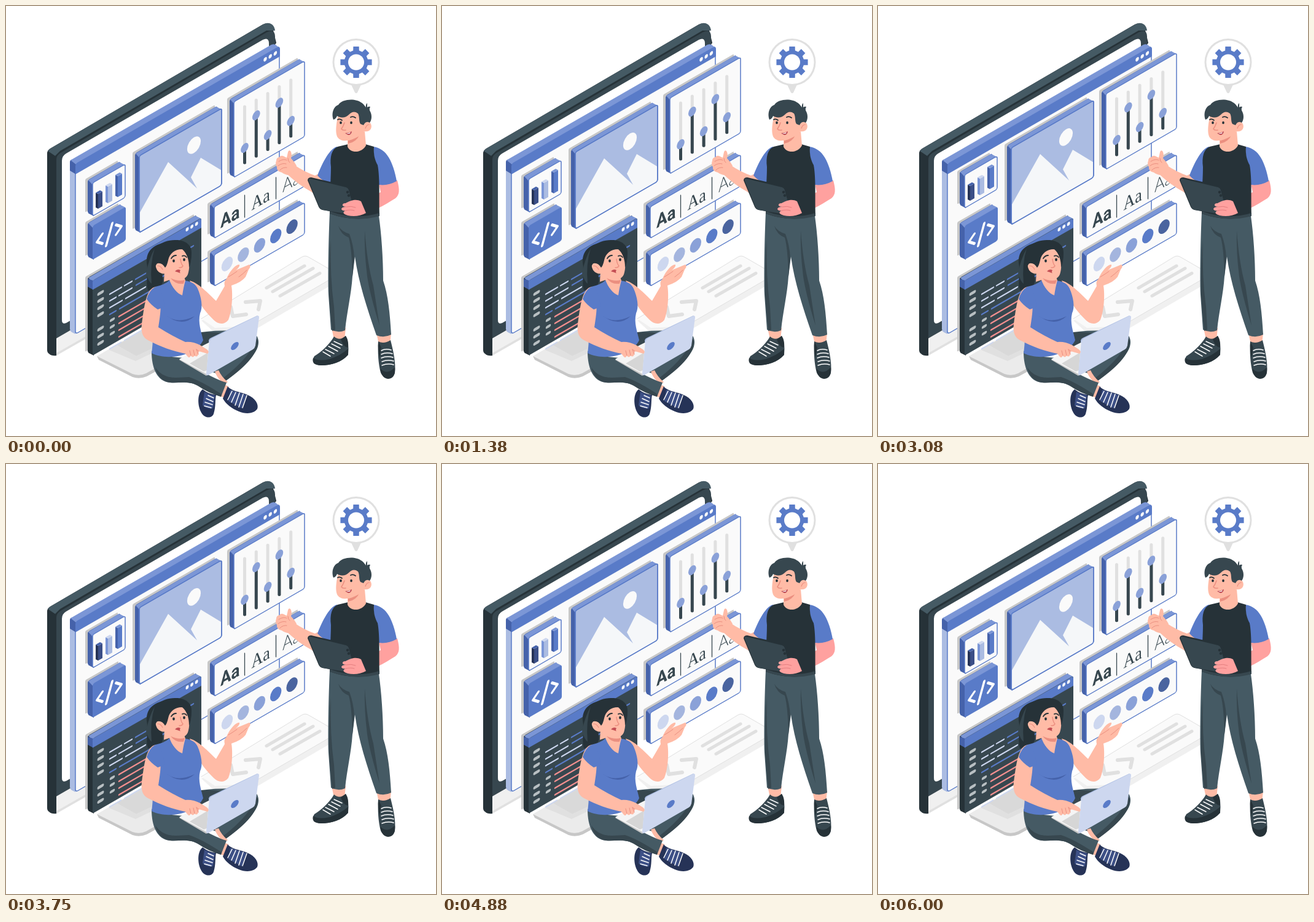
Animation of 700 by 700 pixels, one loop 6040 ms. Source, as an HTML page with a canvas:

```html
<!DOCTYPE html>
<html lang="en">
<head>
<meta charset="utf-8">
<title>Interface design</title>
<style>
html, body { margin: 0; width: 100%; height: 100%; overflow: hidden; background: #fff; }
canvas { display: block; width: 700px; height: 700px; }
</style>
</head>
<body>
<canvas id="stage"></canvas>
<script>
const LOOP = 6040, LIFT = 13.3, SLOPE = 0.577, COS = 0.866;
const BLUE = '#597bc8', DEEP = '#4562aa', LIGHT = '#7b96d6', PALE = '#abbce2', MIST = '#cdd7ef';
const INK = '#263238', SLATE = '#37474f', STEEL = '#455a64', SHEET = '#fafafa', GREY = '#e0e0e0', SHADE = '#c7c7c7';
const SKIN = '#ffbba6', PINK = '#ffa19f', BLUSH = '#eb8f80', NAVY = '#263357';

const canvas = document.getElementById('stage');
const ctx = canvas.getContext('2d');
const dpr = window.devicePixelRatio || 1;
canvas.width = canvas.height = 700 * dpr;

function fill(color, d) {
  ctx.fillStyle = color;
  ctx.fill(new Path2D(d));
}

function line(color, width, d) {
  ctx.strokeStyle = color;
  ctx.lineWidth = width;
  ctx.lineCap = ctx.lineJoin = 'round';
  ctx.stroke(new Path2D(d));
}

function oval(color, x, y, rx, ry, turn = 0) {
  ctx.fillStyle = color;
  ctx.beginPath();
  ctx.ellipse(x, y, rx, ry, turn, 0, Math.PI * 2);
  ctx.fill();
}

// Draws in the plane of the upright screen, with its origin at x, y.
function iso(x, y, draw) {
  ctx.save();
  ctx.transform(1, -SLOPE, 0, 1, x, y);
  draw();
  ctx.restore();
}

const disc = (color, x, y, r) => iso(x, y, () => oval(color, 0, 0, r * COS, r));

function sheet(color, x, y, w, h, r = 3, edge) {
  iso(x, y, () => {
    ctx.beginPath();
    ctx.roundRect(0, 0, w, h, r);
    ctx.fillStyle = color;
    ctx.fill();
    if (edge) {
      ctx.strokeStyle = edge;
      ctx.lineWidth = 1.5;
      ctx.stroke();
    }
  });
}

function block(x, y, w, h, face, depth, { top = LIGHT, side = DEEP, edge } = {}) {
  const dy = depth * SLOPE, rise = w * SLOPE;
  sheet(side, x - depth, y - dy, w, h);
  fill(side, `M${x - depth},${y - dy + 2}L${x + 2},${y}V${y + h}L${x - depth + 1},${y + h - dy}Z`);
  fill(top, `M${x - depth + 1},${y - dy}L${x - depth + w - 2},${y - dy - rise + 1}L${x + w - 1},${y - rise + 1}V${y - rise + 4}L${x},${y + 3}Z`);
  sheet(face, x, y, w, h, 3, edge);
}

function panel(x, y, w, h, face, depth = 7, opt = { edge: BLUE }) {
  sheet(SHADE, x - depth - 4, y - depth * SLOPE - 1.5, w, h, 2);
  block(x, y, w, h, face, depth, opt);
}

function monitor() {
  fill('#ebebeb', 'M148,570L235,519L262,582L228,602Q218,607 207,603L152,575Z');
  fill(SHADE, 'M148,570L206,599Q217,603 228,598L262,579V585L229,603Q217,608 206,604L151,576Z');
  fill('#d9d9d9', 'M180,552L232,523L242,556L212,570Z');
  fill(GREY, 'M180,552L212,570L242,556V563L211,578L168,560Z');
  fill(INK, 'M67,240Q67,235 72,232L418,30Q426,26 433,31L440,60L82,569Q74,570 70,566Q67,564 67,560Z');
  fill(STEEL, 'M68,236Q70,233 74,231L417,31Q426,25 433,30Q437,33 438,40L424,40L88,236L80,244Z');
  fill(SLATE, 'M82,250Q82,243 89,239L424,43Q438,36 438,50V335L82,541Z');
  fill('#f0f0f0', 'M82,541L300,415V443L82,569Z');
  fill(GREY, 'M82,565L140,532V536L82,569Z');
  fill('#fff', 'M91,252Q91,244 98,240L418,55Q428,50 428,61V324L98,516Q91,519 91,511Z');
}

function browser() {
  fill(PALE, 'M104,266L113,271V534L107,531Q104,529 104,526Z');
  sheet(SHEET, 113, 257, 332, 277, 4, BLUE);
  fill(DEEP, 'M104,254Q104,251 107,250L114,256V274L104,268Z');
  fill(LIGHT, 'M105,251L432,63Q437,61 440,64L445,68L114,258Z');
  fill(BLUE, 'M113,260Q113,257 116,255L440,68Q446,65 446,71V82L113,274Z');
  for (let i = 0; i < 3; i++) disc(SHEET, 422 + 8.2 * i, 86.7 - 4.8 * i, 3.2);
}

function codeIcon() {
  panel(141, 358, 54, 55, BLUE, 8, {});
  iso(168, 371.5, () => line('#fff', 4, 'M-11,-7L-20,1L-11,9M5,-15L-5,16M11,-9L20,-1L11,7'));
}

function codePanel() {
  panel(141, 447, 177, 122, SLATE, 8, { side: INK });
  fill(DEEP, 'M133,444L142,447V462L133,457Z');
  fill(BLUE, 'M141,449Q141,447 143,446L315,347Q318,345 318,349V361L141,462Z');
  for (let i = 0; i < 3; i++) disc(SHEET, 295 + 7.6 * i, 363.5 - 4.4 * i, 2.9);
  iso(154, 467, () => {
    [0, 11.6, 23.2, 34.8, 58, 69.6, 81.2].forEach(y => line('#b8bfc2', 5, `M-3,${y}H3`));
  });
  iso(169, 469, () => {
    line(MIST, 2.4, 'M0,0H19M24,0H36M0,11H10M15,11H36M0,22H20M26,22H58');
    line(BLUE, 2.4, 'M42,0H60M43,10H70M64,21H90M0,33H10M16,33H68');
    line('#b8bfc2', 4.5, 'M2,44H6M2,55H6M2,66H6');
    line('#f28f8f', 2.6, 'M15,45H62M15,56H58M15,67H56M15,78H56');
    line(MIST, 2.4, 'M0,89H18M24,89H58');
    line(BLUE, 2.4, 'M120,0H136M78,0H112');
  });
}

function bars(x, y, h, face, side, top) {
  fill(side, `M${x},${y - h}L${x + 4},${y - h + 2}V${y}L${x},${y - 2}Z`);
  fill(face, `M${x + 4},${y - h + 2}L${x + 11},${y - h - 2}V${y - 4}L${x + 4},${y}Z`);
  fill(top, `M${x},${y - h}L${x + 7},${y - h - 4}L${x + 11},${y - h - 2}L${x + 4},${y - h + 2}Z`);
}

function chartPanel() {
  panel(141, 288, 53, 54, SHEET, 8);
  bars(146, 330, 26, '#3b4f87', NAVY, DEEP);
  bars(162, 321, 29, PALE, LIGHT, MIST);
  bars(178, 311, 36, BLUE, DEEP, LIGHT);
}

function picturePanel() {
  panel(217, 244, 134, 125, PALE);
  fill('#f5f7f9', 'M218,336L264,254L311,297L301,279L317,247L350,267V288Q350,291 347,293L220,366Q218,367 218,364Z');
  disc(SHEET, 306, 226.5, 12.8);
  sheet('transparent', 217, 244, 134, 125, 3, BLUE);
}

function sliderPanel() {
  panel(371, 156, 115, 123, SHEET);
  [231, 178, 210, 157.5, 187].forEach((knob, i) => {
    const x = 388.5 + i * 18.8, top = 164 - i * 10.8, end = top + 91;
    line(GREY, 5, `M${x},${top}V${end}`);
    line(SLATE, 5, `M${x},${knob}V${end}`);
    disc('#8aa1d8', x, knob, 7.3);
  });
}

function typePanel() {
  panel(339, 327, 147, 51, SHEET);
  const fonts = ['bold 30px Roboto, sans-serif', '30px "Liberation Serif", serif', '300 29px Lato, sans-serif'];
  fonts.forEach((font, i) => {
    iso(349 + 50.5 * i, 362 - 29.1 * i, () => {
      ctx.scale(COS, 1);
      ctx.font = font;
      ctx.fillStyle = SLATE;
      ctx.fillText('Aa', 0, 0);
    });
  });
  line(SLATE, 1.3, 'M388.5,308V344M439.5,279V314');
}

function colorPanel() {
  panel(339, 405, 147, 51, SHEET);
  [MIST, '#a4b5de', '#8aa1d8', BLUE, '#4a649f'].forEach((color, i) => disc(color, 360 + 26.4 * i, 420 - 15.2 * i, 10.6));
}

function keyboard() {
  fill('#f0f0f0', 'M318,512L525,430V457L410,524L340,532Z');
  fill(SHEET, 'M318,509L481,409Q487,405 493,409L526,428V446L397,521L340,524Z');
  line(GREY, 1, 'M318,509L481,409Q487,405 493,409L526,428M526,446L397,521');
  line(GREY, 5, 'M424,459L486,423M434,465L500,427M446,472L511,435');
  line(GREY, 6, 'M390,482L414,480L411,494M366,490L369,505L391,502');
}

function bubble() {
  fill(GREY, 'M561,126H579L572,141Q570,143 568,141Z');
  oval(GREY, 570, 91.5, 38.5, 38.5);
  oval('#fff', 570, 91.5, 35.5, 35.5);
  ctx.beginPath();
  for (let i = 0; i < 8; i++) {
    [[-0.25, 19.5], [-0.18, 26], [0.18, 26], [0.25, 19.5]].forEach(([turn, r]) => {
      const a = i * Math.PI / 4 + turn;
      ctx.lineTo(570 + r * Math.cos(a), 91.5 + r * Math.sin(a));
    });
  }
  ctx.closePath();
  ctx.fillStyle = BLUE;
  ctx.fill();
  oval('#fff', 570, 91.5, 13, 13);
}

function manLegs() {
  fill(SKIN, 'M530,524H553L551,544L534,543ZM603,532H627L625,551H607Z');
  fill(SLATE, 'M534,538Q543,546 553,537Q559,548 557,567C548,579 530,585 513,585C499,584 498,576 502,570C512,564 526,552 534,538Z');
  fill(INK, 'M500,573Q508,579 526,575Q545,569 557,558V568C546,580 530,585 513,585C501,585 498,580 500,573ZM545,543L553,537Q558,544 557,556Q550,556 545,543Z');
  line('#fff', 1.5, 'M534,546L547,552M530,550L544,557M525,554L540,562M520,559L534,566M516,563L528,570');
  fill(SLATE, 'M606,546Q615,551 626,544C630,560 635,580 633,597C630,608 615,608 610,597C606,582 605,564 606,546Z');
  fill(INK, 'M609,590Q621,602 633,588Q635,606 622,607Q611,606 609,590ZM606,546L611,556L608,572Q605,560 606,546Z');
  line('#fff', 1.5, 'M611,561Q618,557 627,560M611,567Q619,563 629,566M611,573Q620,569 630,572M612,579Q621,575 631,578M612,585Q622,581 631,584');
  fill(STEEL, 'M527,336C525,380 524,440 525,470L529,527Q541,533 552,528C555,498 562,470 564,440L568,408C574,450 587,490 603,536Q615,541 627,535C625,500 622,470 614,447C614,410 611,370 607,342Z');
  fill(SLATE, 'M541,358Q546,367 559,371Q566,390 567,410L564,440Q563,395 558,377Q545,372 541,358ZM529,380Q527,440 534,490L536,527L531,529L526,475Q525,420 529,380ZM584,366Q588,420 598,455L608,520Q592,468 588,440Q583,400 584,366Z');
}

function manTop() {
  fill(SKIN, 'M468,258Q486,270 503,276L511,272L528,288L516,306Q507,310 498,303Q476,291 458,274Z');
  fill(BLUE, 'M539,229C528,231 515,254 507,276Q516,286 529,289L535,260Z');
  fill(PINK, 'M607,290L637,284C641,299 641,307 634,313C615,325 598,334 584,338L574,322L610,303Z');
  fill(BLUE, 'M598,229C620,232 630,254 636,285Q622,293 607,291L600,255Z');
  fill(INK, 'M540,229L557,225H585L599,229C598,243 601,252 605,259C609,280 607,315 608,341Q568,353 527,338C526,315 529,285 529,262C527,246 530,233 540,229Z');
  fill(SLATE, 'M527,334Q568,349 608,337V342Q568,353 527,338Z');
  fill(SKIN, 'M556,214L584,204L586,227C580,239 561,241 556,229Z');
  fill(BLUSH, 'M557,219Q569,216 576,209Q570,222 557,224Z');
  fill(SKIN, 'M542,172C538,188 535,206 540,214C545,221 556,220 564,217C574,213 580,209 583,204C592,206 597,199 594,192C591,187 586,188 582,192L582,170Z');
  line(BLUSH, 1.2, 'M585,199Q587,193 591,193');
  fill(SLATE, 'M533,185C529,174 534,163 541,161C547,151 569,150 578,157C583,160 584,163 586,165Q585,161 588,158Q588,162 588,165Q590,163 593,164Q591,167 592,170C596,176 596,185 592,190C587,187 584,190 582,194L577,192C574,188 576,180 573,175C567,170 562,173 558,177C552,183 544,182 539,179Q537,184 533,185Z');
  line(INK, 1.8, 'M540,185Q543,183 547,186M561,181Q565,179 569,182');
  oval(INK, 545, 190, 1.8, 2.2);
  oval(INK, 562, 190, 1.8, 2.2);
  line(BLUSH, 1.6, 'M551,190Q549,196 546,200Q548,203 553,202');
  fill('#b8434f', 'M552,207Q558,207 563,204Q562,210 557,210Z');
  fill('#fff', 'M554,207Q558,207 561,205.5L560,207.5Q557,208.5 554,207Z');
  fill(SKIN, 'M440,252Q440,247 445,246Q448,242 453,245L457,247L459,238Q460,234 463,236Q466,240 464,248Q470,254 473,260L465,275Q455,276 449,271Q440,269 441,262Q438,257 440,252Z');
  line(BLUSH, 1, 'M444,253Q452,248 457,251M443,260Q450,255 456,257M446,267Q451,262 457,263M459,248Q459,253 462,255');
  fill(INK, 'M497,279L557,293Q561,294 562,298L572,336Q573,341 567,341L515,332Q511,331 509,327L491,284Q491,279 497,279Z');
  fill(SLATE, 'M495,281L553,295Q557,296 558,300L568,337Q568,340 564,340L516,332Q512,331 510,327L493,285Q492,281 495,281Z');
  oval(INK, 556, 303, 2.2, 2.2);
  oval(INK, 558, 308.5, 2.2, 2.2);
  fill(PINK, 'M578,318C570,313 559,317 553,321Q547,321 548,325Q550,327 554,327Q546,327 546,331Q548,334 553,333Q548,335 550,338Q555,342 566,342Q577,342 586,337Z');
  line('#e47f80', 1, 'M554,327Q562,325 569,328M553,333Q561,331 567,333');
}

function womanBack() {
  fill(INK, 'M265,384C243,387 228,396 229,418C232,432 227,449 231,463L253,455C259,444 252,432 249,423L261,405Z');
  fill(SKIN, 'M299,447C314,451 329,468 342,480L356,456Q354,448 359,444C364,432 374,420 380,421Q381,425 374,430L396,421Q400,423 395,429L390,441Q383,450 367,455C370,474 367,499 362,511C355,520 345,518 338,511C325,498 317,488 311,474Z');
  line(BLUSH, 1, 'M362,441Q369,437 376,432M379,441Q386,436 392,430');
  fill(STEEL, 'M318,531C350,527 385,528 401,531C414,537 413,553 406,563C393,582 375,598 355,612L342,598L290,580L305,545Z');
  fill(SLATE, 'M318,531Q358,530 376,540L340,565L312,556ZM406,541Q402,568 352,607L355,612Q413,572 410,544Z');
}

function womanLegs() {
  fill(SKIN, 'M340,595L346,593Q351,604 361,612L356,616Q344,607 340,595ZM349,614L362,619L357,638L347,635Z');
  fill(STEEL, 'M237,562C237,590 246,611 267,613C283,614 297,610 312,618Q332,630 350,636L359,613C337,607 307,588 290,573C269,571 250,570 237,562Z');
  fill(SLATE, 'M243,588C258,611 282,604 298,604Q319,611 351,632L350,636Q329,630 312,618C297,610 283,614 267,613Q248,610 243,588Z');
  fill(NAVY, 'M320,624C311,631 312,650 317,660C322,672 335,672 338,664C342,651 340,642 342,633Q330,632 320,624ZM361,619C366,627 382,628 393,633C406,638 412,649 409,656C402,665 389,664 379,660C367,655 358,648 353,639Z');
  fill('#3d5086', 'M323,628Q332,633 340,634L337,655Q327,657 320,650ZM365,625L391,633L384,655L362,643Z');
  line('#fff', 1.5, 'M329,634L338,638M326,639L337,644M324,645L336,649M323,651L334,654M368,627L361,641M374,629L367,645M380,630L373,650M386,632L379,653M392,634L385,654');
}

function womanTop() {
  fill(BLUE, 'M243,457Q258,454 267,446L290,447C302,448 309,453 312,460C318,474 321,490 316,500C312,516 318,530 321,544C309,570 261,578 237,565C241,540 239,515 232,477Z');
  fill(DEEP, 'M260,503Q278,519 307,505Q286,524 260,503ZM250,492Q244,520 247,532L240,535Q239,505 250,492Z');
  fill(SKIN, 'M258,432L289,438L292,447Q289,457 287,471C278,468 270,457 266,446L257,449Z');
  fill(BLUSH, 'M268,443Q280,449 291,446L289,452Q276,454 268,443Z');
  fill(SKIN, 'M260,406Q270,393 294,397C300,412 299,429 296,437C291,448 277,447 268,442L262,435Q252,438 246,430Q241,421 248,418Q255,417 260,424Z');
  line(BLUSH, 1.1, 'M247,423Q252,423 255,429');
  fill(INK, 'M243,420C233,396 252,381 275,381C291,380 303,389 302,402Q302,417 298,426Q298,406 287,396C277,395 266,402 264,414Q262,423 259,426Q254,417 246,419Z');
  line(INK, 1.8, 'M269,411Q272,406 277,406M287,407Q291,405 294,409');
  oval(INK, 273, 415, 1.9, 2.4);
  oval(INK, 290, 413, 1.9, 2.4);
  line(BLUSH, 1.5, 'M284,412Q285,420 288,423Q287,426 282,426');
  fill('#c44f55', 'M275,432Q279,427 284,430Q282,433 284,435Q279,433 275,432Z');
  fill(SLATE, 'M228,435Q233,410 242,395Q234,420 237,452Q232,449 228,435Z');
}

function laptop() {
  fill(SHADE, 'M282,576L326,602L329,599L285,573Z');
  fill('#f5f5f5', 'M282,575L322,552L334,546L328,600Z');
  fill('#d6d6d6', 'M299,582L329,564L327,593L322,595Z');
  fill(PALE, 'M330,544Q331,541 334,540L409,504L412,506L330,548Z');
  fill(MIST, 'M331,546Q332,543 335,541L408,505Q412,503 412,507L406,553Q405,557 402,559L329,601Q326,602 326,598Z');
  iso(372.5, 553.5, () => oval(BLUE, 0, 0, 6.3, 5.5));
}

function womanArm() {
  fill(SKIN, 'M244,457C228,459 225,489 221,518C219,533 224,541 233,545C250,554 272,562 292,566L296,571Q299,574 301,569Q304,574 307,569Q311,573 313,567L314,562L328,566Q332,563 327,559L316,552Q304,546 292,547Q270,537 248,523C250,510 253,492 251,482Z');
  line(BLUSH, 1, 'M301,569L299,561M307,569L305,560M313,567L310,559M314,562L310,559');
  fill(BLUE, 'M243,457Q255,459 258,490L247,494Q236,487 229,477Q233,463 243,457Z');
}

function scene(time) {
  const phase = time % LOOP / (LOOP / 2);
  const lift = LIFT * (1 - Math.abs(phase - 1));
  ctx.setTransform(dpr, 0, 0, dpr, 0, 0);
  ctx.fillStyle = '#fff';
  ctx.fillRect(0, 0, 700, 700);
  monitor();
  keyboard();
  browser();
  codeIcon();
  codePanel();
  ctx.save();
  ctx.translate(0, -lift);
  chartPanel();
  picturePanel();
  sliderPanel();
  ctx.restore();
  typePanel();
  colorPanel();
  bubble();
  manLegs();
  manTop();
  womanBack();
  womanLegs();
  womanTop();
  laptop();
  womanArm();
}

const start = performance.now();
function tick() {
  scene(performance.now() - start);
  requestAnimationFrame(tick);
}
tick();
</script>
</body>
</html>
```
